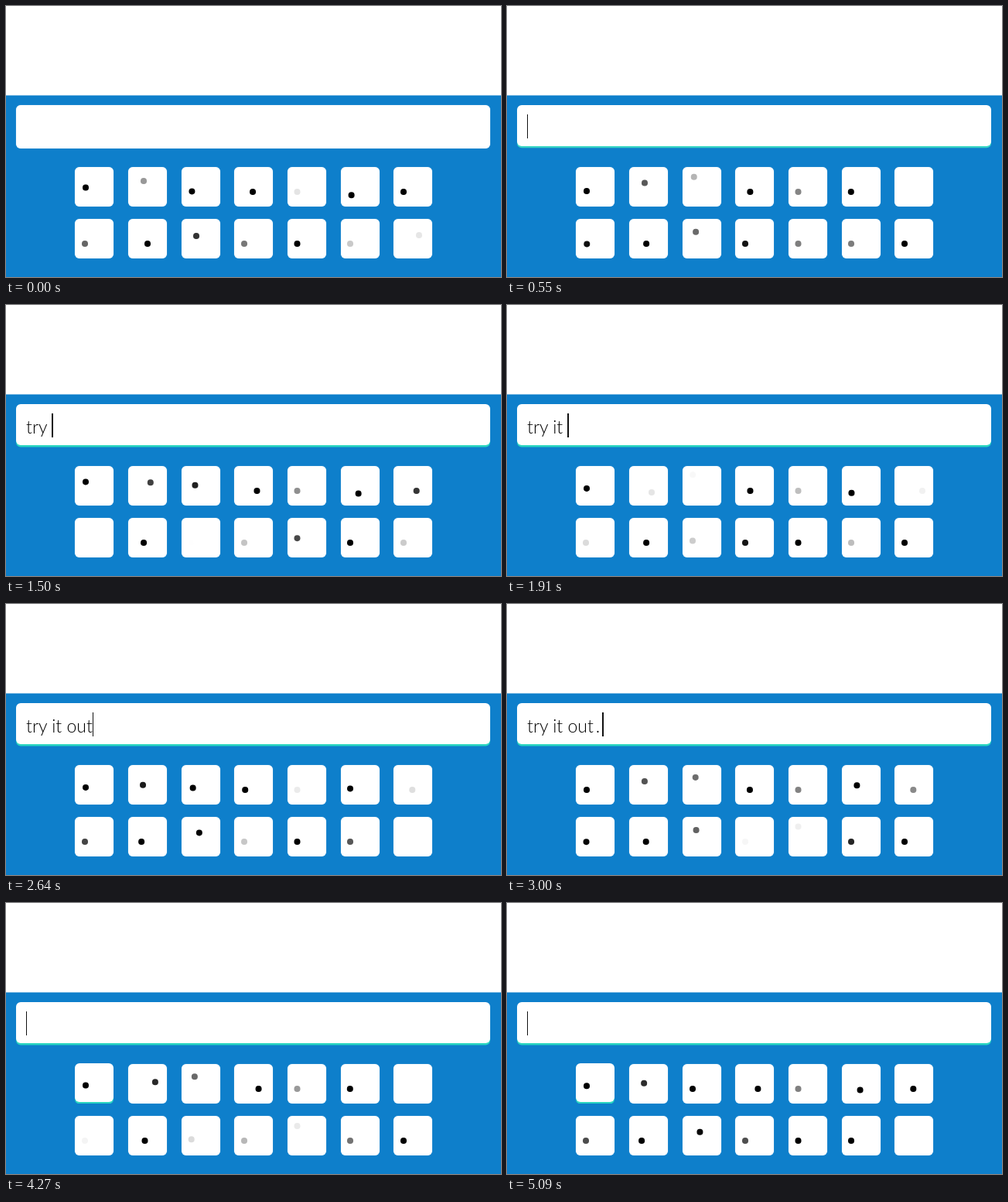
Animation, 640 px wide and 350 px high, one loop 5.13 s. Source, as an HTML page:

```html
<!DOCTYPE html>
<html lang="en">
<head>
<meta charset="utf-8">
<title>Moving dots</title>
<style>
  html, body { margin: 0; width: 100%; height: 100%; overflow: hidden; background: #fff; }
  #stage { position: relative; width: 640px; height: 350px; overflow: hidden; background: #fff; }
  #panel { position: absolute; inset: 115px 0 0; background: #0e7fcb; border-top: 1px solid #7ab9e2; }
  #field, .key { position: absolute; background: #fff; border-radius: 6px;
    box-shadow: 0 0 1px #fffa; }
  #field { left: 13px; width: 613px; top: 128px; height: 56px;
    animation: focus 5130ms linear infinite; }
  .key { width: 50px; height: 51px; }
  .key.first { animation: lift 5130ms linear infinite; }
  .dot { position: absolute; left: -3.8px; top: -3.8px; width: 7.6px; height: 7.6px;
    border-radius: 50%; background: #000; }
  #line { position: absolute; left: 26px; top: 140px; height: 31px;
    white-space: pre; color: #000; font: 300 23px/35px Lato, "Open Sans", sans-serif; }
  #stop { padding: 0 3px; }
  #caret { position: absolute; left: 100%; top: 0; width: 1.4px; height: 31px; background: #111; }
  @keyframes focus {
    0%, 8.6% { height: 56px; box-shadow: 0 0 1px #fffa; }
    11%, 100% { height: 53px; box-shadow: 0 2.5px 0 #2bd6c0; }
  }
  @keyframes lift {
    0%, 62% { transform: none; height: 51px; box-shadow: 0 0 1px #fffa; }
    65%, 100% { transform: translateY(-1px); height: 49.5px; box-shadow: 0 2.5px 0 #2bd6c0; }
  }
</style>
</head>
<body>
<div id="stage">
  <div id="panel"></div>
  <div id="field"></div>
  <div id="line"><span id="text"></span><span id="stop" hidden>.</span><span id="caret"></span></div>
</div>
<script>
const LOOP = 5130;
const FAST = 1280, MEDIUM = 1825, SLOW = 2482;
const REST = 32;
const stage = document.getElementById('stage');
const dots = [];

const mix = (a, b, k) => a + (b - a) * k;
const smooth = p => p * p * (3 - 2 * p);

// Motions return [x, y, opacity] inside a key for a phase from 0 to 1.
// A path runs straight between stops of [phase, x, y, opacity].
const path = (...stops) => p => {
  let i = 0;
  while (i < stops.length - 2 && p > stops[i + 1][0]) i++;
  const [a, b] = [stops[i], stops[i + 1]];
  const k = (p - a[0]) / (b[0] - a[0]);
  return [1, 2, 3].map(n => mix(a[n], b[n], k));
};
const slide = (...stops) => path(...stops.map(([p, x]) => [p, x, REST, 1]));
const fade = (x, opacity) => p => [x, REST, opacity(p)];

const orbit = p => {
  const a = Math.PI * (1 + 2 * smooth(Math.min(1, p / .85)));
  return [17.8 + 6 * Math.cos(a), REST + 6 * Math.sin(a), 1];
};

// One high jump, then two smaller ones.
const bounce = p => {
  const hop = (from, to, h) =>
    p > from && p < to ? h * Math.sin(Math.PI * (p - from) / (to - from)) : 0;
  return [14, REST - hop(.29, .53, 22) - hop(.53, .8, 10) - hop(.8, 1, 5), 1];
};

function addKey(col, row, period, start, motion) {
  const key = document.createElement('div');
  const dot = document.createElement('div');
  key.className = col + row ? 'key' : 'key first';
  key.style.left = Math.round(89.3 + col * 68.67) + 'px';
  key.style.top = 208 + row * 67 + 'px';
  dot.className = 'dot';
  key.append(dot);
  stage.append(key);
  dots.push({ dot, period, start, motion });
}

addKey(0, 0, MEDIUM, .51, bounce);
addKey(1, 0, SLOW, 0, path(
  [0, 20, 18, .4], [.06, 19, 26, .9], [.39, 21, 15, .4], [.44, 20, 19, .6],
  [.72, 35, 23, .85], [.77, 29, 34, .1], [1, 20, 18, .4]));
addKey(2, 0, FAST, .42, path(
  [0, 13, 32, 0], [.4, 13, 32, 1], [.5, 15, 29, 1], [.65, 19, 22, .8],
  [.8, 16, 14, .5], [.92, 13, 11, 0], [1, 13, 11, 0]));
addKey(3, 0, SLOW, 0, slide(
  [0, 24], [.057, 30], [.058, 14], [.44, 26.5], [.745, 32], [.746, 19], [1, 24]));
addKey(4, 0, MEDIUM, .03, fade(12.5, p => .55 * Math.abs(Math.sin(2 * Math.PI * p))));
addKey(5, 0, MEDIUM, .66, orbit);
addKey(6, 0, MEDIUM, 0, path(
  [0, 13, 32, 1], [.02, 13, 32, 1], [.021, 36, 32, .08], [.1, 36, 32, 0], [.34, 24.3, 32, 0],
  [.6, 24.3, 32, .3], [.79, 24.3, 32, 1], [.86, 36, 32, .55], [1, 36, 32, 0]));

addKey(0, 1, SLOW, .3, path(
  [0, 13, 32, 0], [.5, 13, 32, 1], [.69, 24, 35.5, .5], [.74, 25, 36.5, .35],
  [.9, 27, 38, 0], [1, 27, 38, 0]));
addKey(1, 1, SLOW, 0, slide(
  [0, 25], [.03, 26], [.031, 14], [.06, 17], [.44, 29], [.6, 32], [.601, 20], [1, 25]));
addKey(2, 1, SLOW, .4, path(
  [0, 12, 32, 0], [.17, 13, 29.5, .2], [.4, 19, 22, .8], [.46, 23, 20.5, 1],
  [.79, 11, 13, .15], [.87, 9, 13, 0], [1, 9, 13, 0]));
addKey(3, 1, 1667, .26, fade(13, p => (1 - Math.cos(2 * Math.PI * p)) / 2));
addKey(4, 1, FAST, 0, path(
  [0, 12.5, 32, 1], [.1, 12.5, 32, 1], [.33, 12.5, 13.5, .1], [.37, 12.5, 11, 0],
  [.38, 12.5, 32, 0], [.48, 12.5, 32, 1], [1, 12.5, 32, 1]));
addKey(5, 1, MEDIUM, .13, fade(12, p => Math.min(1, p + .08)));
addKey(6, 1, 1250, .85, path(
  [0, 13, 32, 0], [.25, 13, 32, 1], [.47, 13, 32, 1], [.61, 28, 26, .4],
  [.73, 28, 26, .4], [.85, 33, 21, .1], [.9, 34, 20, 0], [1, 34, 20, 0]));

const PHRASES = [['try it ', 1050], ['out', 2300], ['.', 2950]];
const WORDS = PHRASES.map(([part]) => part).join('');
const FOCUS = 470;
const BLINK = 540;
const every = (chars, start, gap) => [...chars].map((_, i) => start + i * gap);
const TYPED = PHRASES.flatMap(([part, start]) => every(part, start, 135));
const ERASED = every(WORDS, 3600, 25);
const EVENTS = [FOCUS, ...TYPED, ...ERASED];
const text = document.getElementById('text');
const stop = document.getElementById('stop');
const caret = document.getElementById('caret');

function drawText(t) {
  const past = list => list.filter(at => at <= t).length;
  const count = past(TYPED) - past(ERASED);
  const last = EVENTS[past(EVENTS) - 1];
  text.textContent = WORDS.slice(0, Math.min(count, WORDS.length - 1));
  stop.hidden = count < WORDS.length;
  const shown = t >= FOCUS && Math.floor((t - last) / BLINK) % 2 === 0;
  caret.style.visibility = shown ? 'visible' : 'hidden';
}

function draw() {
  const t = performance.now() % LOOP;
  for (const { dot, period, start, motion } of dots) {
    const [x, y, opacity] = motion((start + t / period) % 1);
    dot.style.transform = `translate(${x}px, ${y}px)`;
    dot.style.opacity = opacity;
  }
  drawText(t);
  requestAnimationFrame(draw);
}
draw();
</script>
</body>
</html>
```
